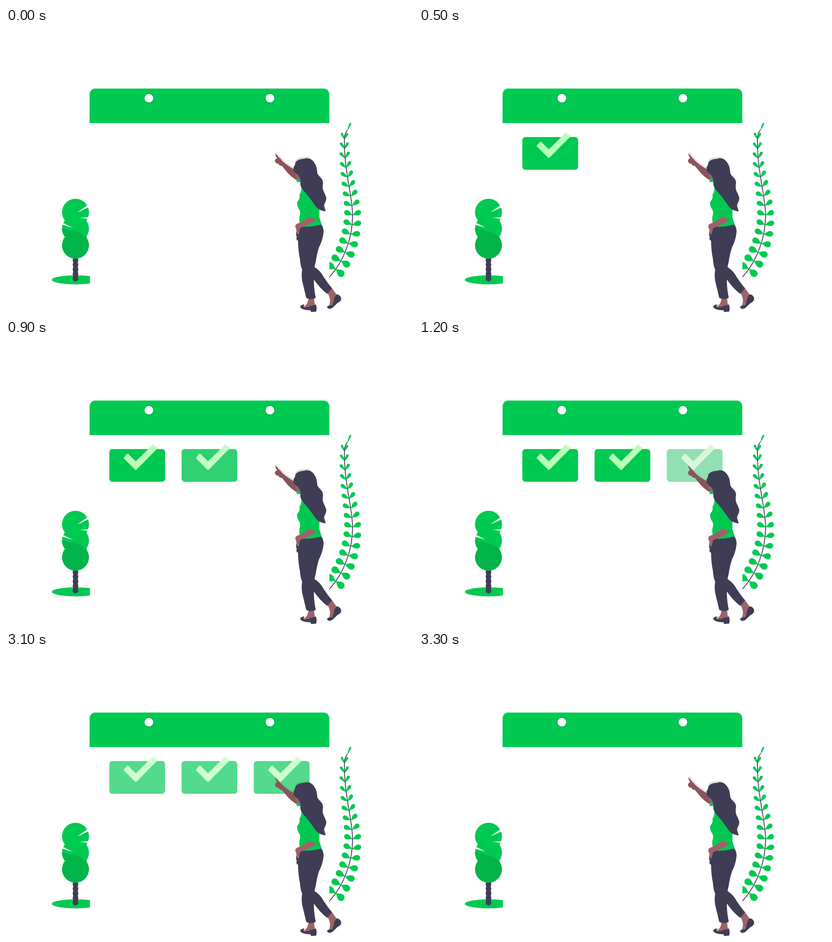
Recreate the animation shown at these times as an HTML page. Size 896 by 625 pixels, loop 3600 ms.

```html
<!DOCTYPE html>
<html lang="en">
<head>
<meta charset="utf-8">
<title>Checklist</title>
<style>
html, body { margin: 0; width: 100%; height: 100%; overflow: hidden; background: #fff; }
svg { display: block; width: 100%; height: 100%; }
.green { fill: #00c952; }
.deep { fill: #00b44a; }
.dark { fill: #3f3d56; }
.skin { fill: #a0616a; }
.shade { fill: none; stroke: #e4e4e4; }
.line { fill: none; stroke: #000; stroke-opacity: .12; }
</style>
</head>
<body>
<svg viewBox="0 0 896 625">
  <defs>
    <clipPath id="rightSide"><path d="M712 0H896V625H712Z"/></clipPath>
    <clipPath id="leftSide"><path d="M0 0H184.7V625H0Z"/></clipPath>
    <clipPath id="middleCrown"><circle cx="153" cy="441.5" r="29.7"/></clipPath>
  </defs>

  <!-- Board -->
  <path class="green" d="M184 209.2V146A12.7 12.7 0 0 1 196.7 133.3H699A12.7 12.7 0 0 1 711.7 146V209.2Z"/>
  <g fill="#fff" stroke="#00b44a" stroke-width="1.8">
    <circle cx="314.5" cy="154.5" r="10.5"/>
    <circle cx="581" cy="154.5" r="10.5"/>
  </g>

  <!-- Tree -->
  <ellipse class="green" cx="153" cy="554.2" rx="52" ry="10" clip-path="url(#leftSide)"/>
  <path d="M153 508V551" stroke="#3f3d56" stroke-width="10.5"/>
  <path d="M153 511V552" stroke="#3f3d56" stroke-width="12.5" stroke-linecap="round" stroke-dasharray="0 10.1"/>
  <g class="green">
    <circle cx="153" cy="405.5" r="29.7"/>
    <circle cx="153" cy="441.5" r="29.7"/>
    <path d="M160 417L179 419.5L176 427Z"/>
  </g>
  <path class="deep" clip-path="url(#middleCrown)" d="M120 440.5Q154 446 178 459V475H120Z"/>
  <circle class="deep" cx="153" cy="478" r="29.7"/>
  <path fill="#fff" d="M157 406L180 389.5L183 394ZM161 417.5L183 416.8V420ZM147 439.5L125 428.8L123 432.5Z"/>

  <!-- Plant -->
  <g clip-path="url(#rightSide)">
    <g id="leaves" class="green"></g>
    <path id="stem" d="M752 224Q745 232 745 245C744 315 763 371 763 412C763 465 742 516 711 549" fill="none" stroke="#3f3d56" stroke-width="1.8"/>
  </g>

  <path class="shade" stroke-width="4" d="M593.5 274.5L606 288Q612 296 634 309"/>
  <path class="shade" stroke-width="5" d="M638 292Q646 284.5 668 285.5"/>
  <g id="cards"></g>

  <!-- Woman -->
  <path class="skin" d="M666 594H678L680 610L668 616L654 614Q665 609 666 594ZM707 582L718 573L728 587Q724 602 714 613L711 611Q717 597 707 582Z"/>
  <path class="dark" d="M648 612Q651 608 657 608.5Q654 613 657 615Q667 614 671 611Q678 611 682 608Q685 615 683 624L672 625L670 621Q653 621 648 615Z"/>
  <path class="dark" d="M728 586Q736 587 738 595Q738 602 730 605Q722 613 717 617Q708 620 707 614Q709 610 713 611Q718 612 721 602Q722 593 728 586Z"/>
  <path class="dark" d="M679 526Q690 533 695 541Q706 559 718 573L707 585Q691 573 676 551Z"/>
  <path class="dark" d="M645 436L694 432Q700 440 699 450Q697 468 689 483Q684 498 682 514Q677 530 678 552Q677 570 682 594Q671 599 661 594L654 565Q649 548 652 532Q648 523 647 508Q643 488 643 468Q638 467 640 459Q637 454 640 446Z"/>
  <path class="line" d="M682 463Q680 470 681 486L679 511Q677 522 679 537"/>
  <path fill="#8b545a" d="M593 276L606 290Q612 298 634 311L650 320V335H641Q632 331 622 321Q610 307 607 303Q602 304 600 299Q592 298 592 291.5Q594 287 597 287Q593 282 593 276Z"/>
  <path class="skin" d="M635 316L652 322V335H645Q637 326 635 316Z"/>
  <path class="green" d="M639 331L651 335L653 345Q660 352 675 365L690 392V417L695 432Q673 439 651 437Q644 430 646 415Q649 406 646 400Q640 393 641 383Q648 375 646 368Q652 356 650 348L648 339H640Z"/>
  <path class="line" d="M650 368Q658 380 664 394Q670 406 677 415Q680 421 691 422"/>
  <path class="skin" d="M668 414Q675 420 682 420Q683 423 675 428Q660 436 648 440Q645 446 645.5 452Q643 457 640 452Q640 444 637 438Q636 432 642 430.5Q657 425 668 414Z"/>
  <path class="dark" d="M633 311C633 302 636 306 637 296Q643 288 655 288Q663 285 670 288C679 293 685 305 685 317C686 327 698 329 698 341C695 357 701 360 705 373C706 383 698 387 701 394L704 403.5C684 402 681 390 672 379C664 365 649 355 648 344C649 333 646 324 639 321Q634 317 633 311Z"/>
</svg>

<script>
const GREEN = '#00c952', CHECK = '#b8ffb9', PALE = '#f0f0f0';
const LOOP = 3600, STEP = 100, FADE_IN = 500, OUT_START = 3000, FADE_OUT = 300;
const CARD_COUNT = 3, CARD_GAP = 159, LEAF_PAIRS = 15;
const clamp = v => Math.max(0, Math.min(1, v));
const repeat = (count, make) => Array.from({ length: count }, (_, i) => make(i)).join('');

// A teardrop with its point at (x, y), turned by angle degrees.
function leaf({ x, y }, angle, length, width) {
  const r = width / 2, shoulder = length - r;
  return `<path transform="translate(${x} ${y}) rotate(${angle})" d="M0 0
    C${length * .28} ${-r * .4} ${length * .4} ${-r} ${shoulder} ${-r}
    A${r} ${r} 0 0 1 ${shoulder} ${r}
    C${length * .4} ${r} ${length * .28} ${r * .4} 0 0Z"/>`;
}

// Leaf pairs open wider and grow larger toward the foot of the stem.
const stem = document.getElementById('stem');
function leafPair(i) {
  const distance = 23 + 21 * i;
  const base = stem.getPointAtLength(distance);
  const above = stem.getPointAtLength(distance - 2);
  const upward = Math.atan2(above.y - base.y, above.x - base.x) * 180 / Math.PI;
  const spread = 25 + 5 * i, length = 16 + .5 * i, width = 5 + .75 * i;
  return leaf(base, upward - spread, length, width) + leaf(base, upward + spread, length, width);
}
document.getElementById('leaves').innerHTML =
  repeat(LEAF_PAIRS, leafPair) + leaf({ x: 751, y: 226 }, -65, 19, 4);

const cardGroup = document.getElementById('cards');
cardGroup.innerHTML = repeat(CARD_COUNT, i => `<g transform="translate(${i * CARD_GAP} 0)">
  <rect x="227.5" y="240" width="122.7" height="72" rx="6.5"/>
  <path d="M261.3 259.5L267.8 252L285.8 270L324 232L330.7 238.5L285.8 284Z"
    stroke-width="4" stroke-linejoin="round"/></g>`);
const cards = [...cardGroup.children];

function draw(now) {
  const time = Math.floor(now % LOOP / STEP) * STEP;
  cardGroup.setAttribute('opacity', 1 - clamp((time - OUT_START) / FADE_OUT));
  cards.forEach((card, i) => {
    const progress = clamp((time - i * FADE_IN) / FADE_IN);
    const tint = color => `color-mix(in srgb, ${color} ${progress * 100}%, ${PALE})`;
    const [box, check] = card.children;
    card.style.display = progress ? '' : 'none';
    box.style.fill = tint(GREEN);
    check.style.fill = check.style.stroke = tint(CHECK);
  });
}

const start = performance.now();
function tick() {
  draw(performance.now() - start);
  requestAnimationFrame(tick);
}
tick();
</script>
</body>
</html>
```
